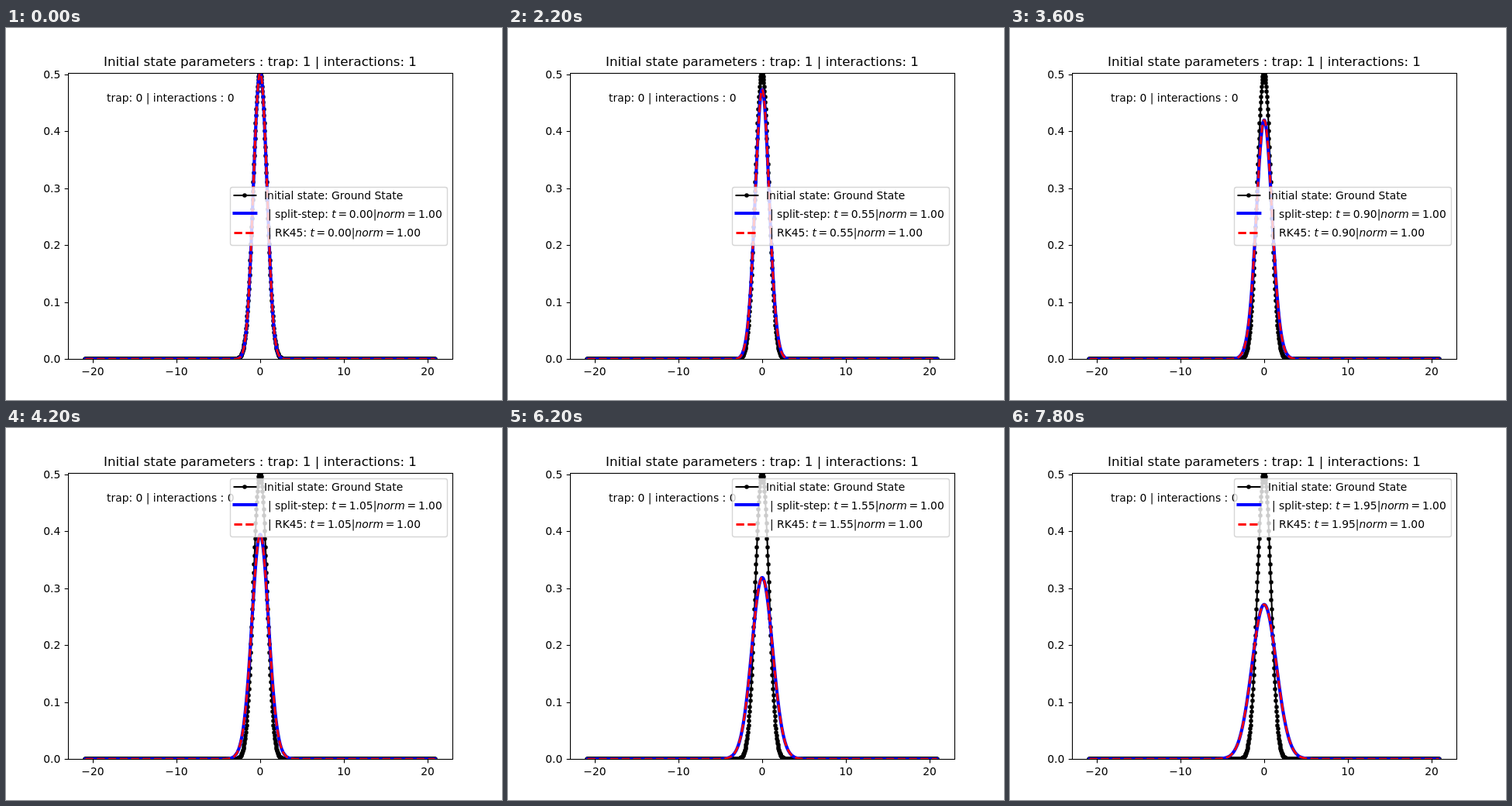
An HTML page with a canvas that plays this animation: 640x480 px, repeating every 8000 ms.

```html
<!DOCTYPE html>
<html lang="en">
<head>
<meta charset="utf-8">
<title>Wave packet expansion</title>
<style>
  html, body { margin: 0; width: 100%; height: 100%; overflow: hidden; background: #fff; }
  canvas { display: block; }
</style>
</head>
<body>
<canvas id="stage" width="640" height="480"></canvas>
<script>
const ctx = document.getElementById('stage').getContext('2d');

const LOOP = 8000, STEP = 200, TIME_PER_STEP = 0.05;
const POINTS = 1024, HALF = POINTS / 2;
const DX = 41.76 / (POINTS - 1);
const LEFT = 80, RIGHT = 576, TOP = 57.6, BOTTOM = 427.2, CENTER = 328, UNIT = 10.8;
const FONT = 13.89;
const gridX = j => (j + 0.5) * DX;

function normalize(psi) {
  const norm = Math.sqrt(2 * DX * psi.reduce((sum, p) => sum + p * p, 0));
  return psi.map(p => p / norm);
}

// Ground state for trap = 1, interactions = 1, on x > 0, by imaginary time.
function groundState() {
  const size = 170, dt = 0.8 * DX * DX;
  let psi = Array.from({ length: size }, (_, j) => Math.exp(-(gridX(j) ** 2) / 2.4));
  for (let n = 0; n < 5000; n++) {
    psi = normalize(psi).map((p, j, all) => {
      const before = all[Math.max(j - 1, 0)], after = all[j + 1] || 0;
      const curvature = (before - 2 * p + after) / (DX * DX);
      return p + dt * (curvature / 2 - (gridX(j) ** 2 / 2 + p * p) * p);
    });
  }
  return normalize(psi);
}

const ground = groundState();
const DK = 0.08;
const spectrum = Array.from({ length: 90 }, (_, m) => {
  const k = m * DK;
  const sum = ground.reduce((s, p, j) => s + p * Math.cos(k * gridX(j)), 0);
  return { k, amp: sum * 2 * DX * DK / Math.PI * (m ? 1 : 0.5) };
});

// Free evolution: each plane wave only turns its phase.
function density(time) {
  const waves = spectrum.map(({ k, amp }) => ({
    k, re: amp * Math.cos(k * k * time / 2), im: amp * Math.sin(k * k * time / 2)
  }));
  return Array.from({ length: HALF }, (_, j) => {
    let re = 0, im = 0;
    for (const w of waves) {
      const c = Math.cos(w.k * gridX(j));
      re += w.re * c;
      im += w.im * c;
    }
    return re * re + im * im;
  });
}

const initial = density(0);
const Y_SCALE = (BOTTOM - TOP) / initial[0];
const toY = value => BOTTOM - value * Y_SCALE;

function curvePoints(half) {
  return Array.from({ length: POINTS }, (_, i) => {
    const j = i < HALF ? HALF - 1 - i : i - HALF;
    return [CENTER + (i - HALF + 0.5) * DX * UNIT, toY(half[j])];
  });
}

function strokeLine(points, color, width, dash = []) {
  ctx.strokeStyle = color;
  ctx.lineWidth = width;
  ctx.lineJoin = 'round';
  ctx.lineCap = dash.length ? 'butt' : 'square';
  ctx.setLineDash(dash);
  ctx.beginPath();
  points.forEach(([x, y]) => ctx.lineTo(x, y));
  ctx.stroke();
  ctx.setLineDash([]);
}

function dot(x, y) {
  ctx.fillStyle = '#000';
  ctx.beginPath();
  ctx.arc(Math.round(x), Math.round(y), 2.78, 0, 2 * Math.PI);
  ctx.fill();
}

const drawInitial = points => strokeLine(points, '#000', 2.08);
const drawSplit = points => strokeLine(points, '#00f', 4.17);
const drawRk = points => strokeLine(points, '#f00', 2.78, [10.28, 4.44]);

function text(str, x, y, { size = FONT, align = 'left', italic = false } = {}) {
  ctx.font = `${italic ? 'italic ' : ''}${size}px "DejaVu Sans", sans-serif`;
  ctx.textAlign = align;
  ctx.fillStyle = '#000';
  ctx.fillText(str, x, y);
  return x + ctx.measureText(str).width;
}

function drawAxes() {
  ctx.strokeStyle = '#000';
  ctx.lineWidth = 1.11;
  ctx.lineJoin = 'miter';
  ctx.strokeRect(LEFT + 0.5, 58.5, RIGHT - LEFT, 369);
  for (let v = -20; v <= 20; v += 10) {
    const x = CENTER + v * UNIT;
    strokeLine([[x + 0.5, 428], [x + 0.5, 431.8]], '#000', 1.11);
    text(String(v).replace('-', '\u2212'), x, 448, { align: 'center' });
  }
  for (let i = 0; i <= 5; i++) {
    const y = Math.round(toY(i / 10));
    strokeLine([[80, y + 0.5], [76.2, y + 0.5]], '#000', 1.11);
    text((i / 10).toFixed(1), 70.3, y + 5, { align: 'right' });
  }
}

function formula(label, clock, x, y, shift) {
  const gap = 0.195 * FONT;
  let pen = text(label, x + shift, y);
  pen = text('t', pen, y, { italic: true });
  pen = text('=', pen + gap, y) + gap - shift;
  pen = text(clock + '|', pen, y);
  pen = text('norm', pen, y, { italic: true });
  pen = text('=', pen + gap, y) + gap;
  text('1.00', pen, y);
}

function drawLegend(clock, top) {
  const shift = clock.includes('7') ? 1 : 0;   // kerned digits make the box narrower
  const x = 289.5 + shift;
  ctx.beginPath();
  ctx.roundRect(x, top, 569.5 - x, 75, 2.78);
  ctx.fillStyle = 'rgba(255,255,255,0.8)';
  ctx.fill();
  ctx.strokeStyle = 'rgba(204,204,204,0.8)';
  ctx.lineWidth = 1.39;
  ctx.stroke();

  const handle = dy => [[x + 5, top + dy], [x + 32.8, top + dy]];
  drawInitial(handle(10.5));
  dot(x + 18.9, top + 10.5);
  drawSplit(handle(33.5));
  drawRk(handle(59));

  text('Initial state: Ground State', 333 + shift, top + 15.5);
  formula(' | split-step: ', clock, 333.5, top + 39.5, shift);
  formula(' | RK45: ', clock, 333.5, top + 63.5, shift);
}

const initialPoints = curvePoints(initial);

function draw(step) {
  const time = step * TIME_PER_STEP;
  const points = curvePoints(density(time));
  ctx.fillStyle = '#fff';
  ctx.fillRect(0, 0, 640, 480);

  ctx.save();
  ctx.beginPath();
  ctx.rect(LEFT, 58, RIGHT - LEFT, 369);
  ctx.clip();
  drawInitial(initialPoints);
  initialPoints.forEach(([x, y]) => dot(x, y));
  drawSplit(points);
  drawRk(points);
  ctx.restore();

  drawAxes();
  text('Initial state parameters : trap: 1 | interactions: 1', CENTER, 49,
    { size: 16.67, align: 'center' });
  text('trap: 0 | interactions : 0', 130, 95);
  // The legend moves up once the packet has sunk below the upper corner.
  drawLegend(time.toFixed(2), step < 19 ? 205.5 : 65.5);
}

let shown = -1;
function tick() {
  const step = Math.floor(performance.now() % LOOP / STEP);
  if (step !== shown) draw(shown = step);
  requestAnimationFrame(tick);
}
tick();
</script>
</body>
</html>
```
